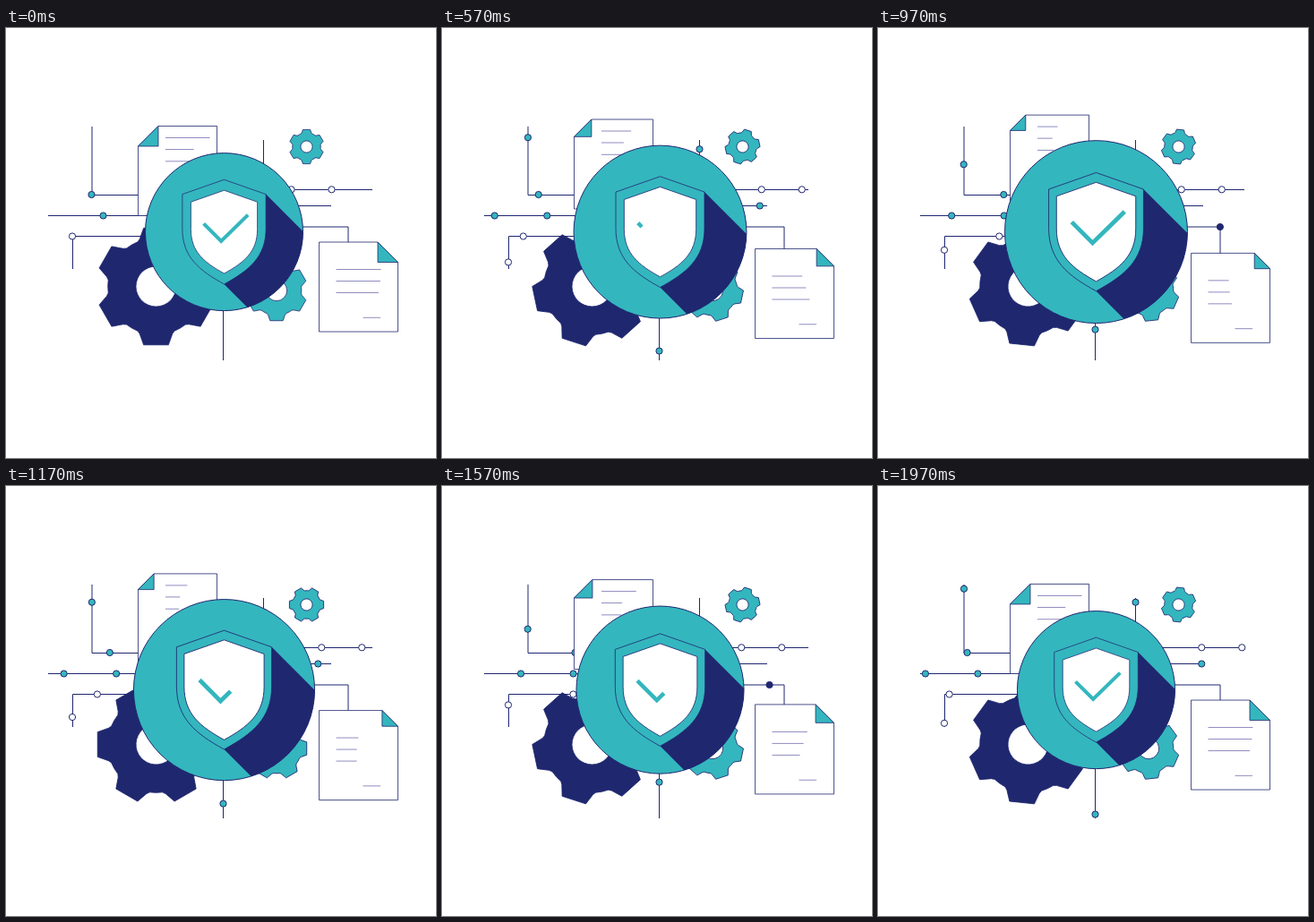
Animation of 480x480 px, one loop 2000 ms. Source, as an HTML page with a canvas:

```html
<!DOCTYPE html>
<html lang="en">
<head>
<meta charset="utf-8">
<title>Data protection</title>
<style>
html, body { margin: 0; width: 100%; height: 100%; overflow: hidden; background: #fff; }
canvas { display: block; }
</style>
</head>
<body>
<canvas width="480" height="480"></canvas>
<script>
const ctx = document.querySelector('canvas').getContext('2d');
const NAVY = '#1f276f', TEAL = '#34b6be', WHITE = '#fff', SOFT = '#8f8cbf';
const FRAMES = 60, FLOW_FRAMES = 20, LOOP = 2000, CX = 243.5, CY = 227.6;

// Six-toothed gear with a round hole
const gear = new Path2D();
for (let i = 0; i < 6; i++) {
  const mid = Math.PI / 6 + i * Math.PI / 3;
  const at = (r, deg) => {
    const a = mid + deg * Math.PI / 180;
    gear.lineTo(r * Math.cos(a), r * Math.sin(a));
  };
  at(56, -19);
  at(66.7, -12);
  at(66.7, 12);
  at(56, 19);
  gear.arc(0, 0, 53.8, mid + .39, mid + Math.PI / 3 - .39);
}
gear.closePath();
gear.moveTo(22.5, 0);
gear.arc(0, 0, 22.5, 0, 7);

const shield = new Path2D('M0-62.5L50-45V-4C50 30 30 46 0 62.5C-30 46-50 30-50-4V-45Z');
const check = new Path2D('M-30.8-12.4L-4.5 14L35.9-25.5');
const CHECK_LENGTH = 94;

const wires = new Path2D(
  'M96 110V186.5H155M47 209.5H170M74.5 269V232.5H180M300 180.5H409' +
  'M300 198.5H363M300 222H382V262M242.5 300V371M287.5 125V170');

const clamp = v => Math.max(0, Math.min(1, v));
const wave = (t, delay = 0) => Math.cos((t - delay) / LOOP * 2 * Math.PI);

function paint(path, fill, width = .8) {
  ctx.fillStyle = fill;
  ctx.strokeStyle = NAVY;
  ctx.lineWidth = width;
  ctx.fill(path, 'evenodd');
  ctx.stroke(path);
}

function placed(x, y, scale, angle, draw) {
  ctx.save();
  ctx.translate(x, y);
  ctx.rotate(angle);
  ctx.scale(scale, scale);
  draw();
  ctx.restore();
}

function drawGear(x, y, scale, angle, fill) {
  placed(x, y, scale, angle, () => paint(gear, fill, .8 / scale));
}

function dot(x, y, fill) {
  const p = new Path2D();
  p.arc(x, y, 3.6, 0, 7);
  paint(p, fill, 1);
}

// p: share of the short dot cycle, 0 to 1
function drawDots(p, docTop) {
  const move = (x0, y0, x1, y1, fill) => dot(x0 + (x1 - x0) * p, y0 + (y1 - y0) * p, fill);
  move(177, 186, 95.5, 186, TEAL);
  move(95.5, 186, 96, 111, TEAL);
  move(167, 209.5, 108.5, 209.5, TEAL);
  move(108.5, 209.5, 50, 209.5, TEAL);
  move(185.5, 232.5, 74, 232.5, WHITE);
  move(74, 232.5, 74, 266.5, WHITE);
  move(318.5, 180.3, 363.5, 180.3, WHITE);
  move(363.5, 180.3, 408.5, 180.3, WHITE);
  move(299.7, 198.5, 364.5, 198.5, TEAL);
  move(242.5, 309.7, 242.5, 369.5, TEAL);
  move(287.5, 182, 287.5, 127, TEAL);
  // This one turns down at the corner and slips under the page
  const x = 319 + 126 * p + .5 * (docTop - 239);
  dot(Math.min(x, 382), 222 + Math.max(0, x - 382), NAVY);
}

// side: -1 folds the left corner, 1 the right one
function drawPage(x, y, side, fold, lines) {
  const outer = side < 0 ? x : x + 88, far = side < 0 ? x + 88 : x;
  const fx = outer - side * fold;
  paint(new Path2D(`M${fx} ${y}L${outer} ${y + fold}V${y + 100}H${far}V${y}Z`), WHITE);
  paint(new Path2D(`M${fx} ${y}L${outer} ${y + fold}H${fx}Z`), TEAL);
  ctx.strokeStyle = SOFT;
  ctx.lineWidth = 1;
  ctx.beginPath();
  for (const [x0, x1, dy] of lines) {
    ctx.moveTo(x0, y + dy);
    ctx.lineTo(x1, y + dy);
  }
  ctx.stroke();
}

function drawBadge(t) {
  const disc = new Path2D();
  disc.arc(CX, CY, 95 - 7 * wave(t), 0, 7);
  paint(disc, TEAL, 1);
  const outer = .997 - .067 * wave(t, 100);
  const inner = .815 - .078 * wave(t, 115);

  ctx.save();
  ctx.clip(disc);
  placed(CX, CY, outer, 0, () => {
    ctx.fillStyle = NAVY;
    ctx.fill(new Path2D('M50-45l200 200L200 262.5L0 62.5Z'));
  });
  ctx.restore();

  placed(CX, CY, outer, 0, () => paint(shield, TEAL));
  placed(CX, CY, inner, 0, () => paint(shield, WHITE, 1));

  // The tick is drawn and wiped symmetrically around the middle of the loop
  const m = Math.min(t, LOOP - t);
  const drawn = clamp(Math.max((590 - m) / 290, (m - 670) / 280));
  if (drawn > 0) placed(CX, CY, inner, 0, () => {
    ctx.strokeStyle = TEAL;
    ctx.lineWidth = 5.4;
    ctx.setLineDash([CHECK_LENGTH * drawn, 200]);
    ctx.stroke(check);
  });
}

function frame(now) {
  // Poses are held at 30 per second, switching on 10 ms ticks
  const n = Math.floor((now + 5) * FRAMES / LOOP) % FRAMES;
  const t = n * LOOP / FRAMES, w = wave(t), turn = t / LOOP * 2 * Math.PI;
  const fold = 19.9 + 2.6 * w, rightTop = 245.2 - 6.2 * w;
  ctx.fillStyle = WHITE;
  ctx.fillRect(0, 0, 480, 480);

  drawGear(167.5, 288.5, 1, -turn, NAVY);
  drawGear(302, 293, .517, turn, TEAL);
  drawGear(335.5, 132.5, .293, -turn, TEAL);

  ctx.strokeStyle = NAVY;
  ctx.lineWidth = 1;
  ctx.stroke(wires);
  drawDots(n % FLOW_FRAMES / FLOW_FRAMES, rightTop);

  drawPage(147.5, 103.3 + 6.2 * w, -1, fold, [
    [178, 214 + 13.5 * w, 13],
    [178, 202 + 8 * wave(t, 100), 26],
    [178, 205 + 12 * wave(t, 200), 39.3]
  ]);
  drawPage(349.5, rightTop, 1, fold, [
    [368.5, 405 + 13.5 * w, 30.5],
    [368.5, 405 + 13.5 * wave(t, 100), 43.5],
    [368.5, 405 + 13.5 * wave(t, 200), 56.5],
    [398.5, 418, 84.3]
  ]);
  drawBadge(t);
  requestAnimationFrame(frame);
}
requestAnimationFrame(frame);
</script>
</body>
</html>
```
